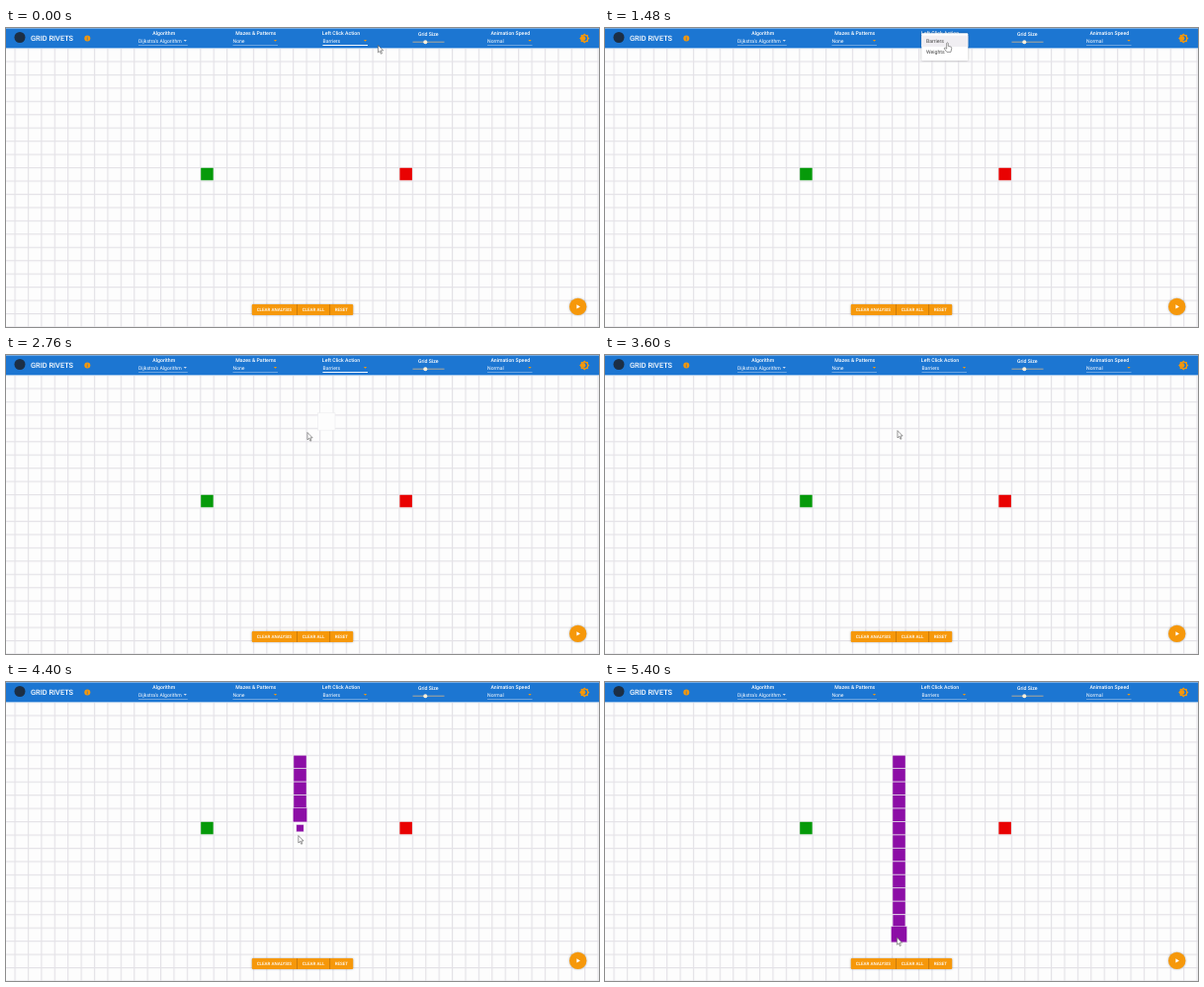
Write an HTML page that moves like this. It is 600x303 px and loops after 5440 ms.

```html
<!DOCTYPE html>
<html lang="en">
<head>
<meta charset="utf-8">
<title>Pathfinding grid</title>
<style>
html, body { margin: 0; height: 100%; overflow: hidden; background: #fdfdfd; }
svg { display: block; width: 600px; height: 303px; }
text { font: 500 5.2px Roboto, Arial, sans-serif; fill: #fff; text-rendering: geometricPrecision; }
.mid { text-anchor: middle; }
.value { font-weight: 400; font-size: 5.1px; }
.btn text { font-size: 4.5px; text-anchor: middle; }
.menu text { font-weight: 400; fill: #444; }
.drop { filter: drop-shadow(0 .6px .8px rgba(0, 0, 0, .3)); }
</style>
</head>
<body>
<svg viewBox="0 0 600 303">
  <defs>
    <pattern id="grid" x="290.1" y="73.8" width="13.41" height="13.45" patternUnits="userSpaceOnUse">
      <path d="M0 .6H13.41M.6 0V13.45" stroke="#e4e2e7" stroke-width="1.2" fill="none"/>
    </pattern>
  </defs>
  <rect width="600" height="303" fill="#fdfdfd"/>
  <rect y="21" width="600" height="282" fill="url(#grid)"/>
  <rect x="197.2" y="141.8" width="12.5" height="12.5" fill="#069a0a"/>
  <rect x="398.4" y="141.8" width="12.5" height="12.5" fill="#e90202"/>
  <g id="cells"></g>

  <rect y=".4" width="600" height="20" fill="#1c76d2"/>
  <circle cx="14" cy="9.5" r="5.5" fill="#1c2f45"/>
  <text x="25" y="13" style="font-size:7.4px">GRID RIVETS</text>
  <circle cx="82.3" cy="10.6" r="3" fill="#f6980a"/>
  <path d="M82.3 8.8v.8M82.3 10.2v2.2" stroke="#1c76d2" stroke-width=".7"/>
  <g id="fields"></g>
  <path id="focus" d="M320.5 17.5H366" stroke="#fff" stroke-width=".9"/>
  <text class="mid" x="427.3" y="7.6">Grid Size</text>
  <path d="M411.5 14.2H443.5" stroke="#d6b58a" stroke-width=".8"/>
  <circle cx="424.3" cy="14.2" r="2" fill="#fff0d8"/>
  <g transform="translate(585.3 10.5)" fill="#f6980a">
    <path d="M-3.6-3.6H3.6V3.6H-3.6Z"/>
    <path d="M-3.6-3.6H3.6V3.6H-3.6Z" transform="rotate(45)"/>
    <circle r="2.8" fill="#1c76d2"/>
    <circle cx="-1.3" r="2.4"/>
  </g>

  <g class="btn">
    <rect class="drop" x="248.8" y="280" width="102.4" height="11" rx="1" fill="#f6980a"/>
    <path d="M294.5 280v11M327.6 280v11" stroke="#b96f08" stroke-width=".7"/>
    <text x="271.3" y="287.1">CLEAR ANALYSIS</text>
    <text x="311" y="287.1">CLEAR ALL</text>
    <text x="339.4" y="287.1">RESET</text>
  </g>
  <circle class="drop" cx="578.7" cy="282.4" r="8.7" fill="#f6980a"/>
  <path d="M577.4 280.2L581 282.4 577.4 284.6Z" fill="#fff"/>

  <g id="menu" class="menu">
    <rect class="drop" x="320.3" y="5.3" width="47" height="27.6" rx="1" fill="#fff"/>
    <rect x="320.3" y="7.6" width="47" height="11.4" fill="#f0eef2"/>
    <rect id="ripple" x="325" y="8.2" width="32.4" height="10.6" rx="1.5" fill="#b9b9b9"/>
    <text x="325" y="15.1">Barriers</text>
    <text x="325" y="26.4">Weights</text>
  </g>

  <g id="cursor" stroke-linejoin="round" stroke="#555" stroke-width=".6" fill="#fff">
    <path id="arrow" d="M0 0V7.4L1.7 5.9 2.9 8.7 4 8.2 2.8 5.4H5.2Z"/>
    <path id="hand" d="M-.8.7Q0-.4.8.7V3.6L3.7 4.4Q4.4 4.7 4.3 5.6L3.5 9.6H-.6L-3.2 6.2Q-3.2 5-2 5.4L-.8 6.4Z"/>
  </g>
</svg>
<script>
const LOOP = 5440, COL = 13.41, ROW = 13.45, SIZE = 12.6;
const $ = id => document.getElementById(id);
const clamp = v => Math.max(0, Math.min(1, v));
const show = (id, on) => $(id).setAttribute('visibility', on ? 'visible' : 'hidden');

// label, label centre, value, left edge, caret x, caret colour
const fields = [
  ['Algorithm', 159.7, "Dijkstra's Algorithm", 134, 181.3, '#d5dff0'],
  ['Mazes &amp; Patterns', 252.8, 'None', 229.5, 272.5, '#f6980a'],
  ['Left Click Action', 339, 'Barriers', 320.5, 363.5, '#f6980a'],
  ['Animation Speed', 510.3, 'Normal', 487, 530, '#f6980a'],
];
$('fields').innerHTML = fields.map(([label, mid, value, x, caret, color]) => `
  <text class="mid" x="${mid}" y="7.2">${label}</text>
  <text class="value" x="${x}" y="14.7">${value}</text>
  <path d="M${caret - 1.6} 12.1h3.2l-1.6 1.7z" fill="${color}"/>
  <path d="M${x} 17.5H${caret + 2.5}" stroke="#9fc3ea" stroke-width=".6"/>`).join('');

// time, x, y of the pointer tip
const path = [
  [0, 376.5, 17.5], [400, 358, 13], [800, 355.5, 12.5], [1150, 353, 13], [1400, 347, 15],
  [1700, 345, 14], [2330, 345, 13.5], [2640, 322, 64], [2760, 305, 78.5], [3000, 298, 75],
  [3300, 296, 76.5], [3600, 296, 76.5], [3920, 295, 107.5], [4880, 296.7, 203.5], [LOOP, 295.3, 263],
];
function pointer(t) {
  const i = path.findIndex(p => p[0] > t);
  const [t0, x0, y0] = path[i - 1], [t1, x1, y1] = path[i];
  const k = (t - t0) / (t1 - t0);
  return [x0 + (x1 - x0) * k, y0 + (y1 - y0) * k];
}

// column and row relative to the top wall cell, time entered
const hovers = [[3, -4, 2410], [3, -3, 2490], [2, -2, 2570], [2, -1, 2655], [1, 0, 2770], [0, 0, 2890]];
const wallStart = r => r === 0 ? 3610 : r <= 8 ? 3690 + r * 137 : 4786 + (r - 8) * 105;

function pulse(age, from) {
  const k = age / 100;
  return k < 1 ? from + (1.4 - from) * k : Math.max(1, 1.4 - .4 * (k - 1));
}
function cell(col, row, scale, style) {
  const s = SIZE * scale;
  const x = 297.5 + col * COL - s / 2, y = 80.9 + row * ROW - s / 2;
  return `<rect x="${x}" y="${y}" width="${s}" height="${s}" ${style}/>`;
}

function draw(t) {
  let out = '';
  for (const [col, row, start] of hovers) {
    const age = t - start;
    if (age >= 0 && age < 200) out += cell(col, row, pulse(age, 1), 'fill="#fdfdfd" stroke="#ececee" stroke-width=".6"');
  }
  for (let r = 0; r < 14; r++) {
    const age = t - wallStart(r);
    if (age >= 0) out += cell(0, r, pulse(age, .3), 'fill="#8c0ea6"' + (age < 200 ? ' stroke="#f4e8f7" stroke-width=".5"' : ''));
  }
  $('cells').innerHTML = out;

  $('menu').setAttribute('opacity', clamp((t - 560) / 120) * clamp((2370 - t) / 110));
  $('ripple').setAttribute('opacity', clamp((t - 2100) / 120));

  const onMenu = t > 260 && t < 2380;
  $('cursor').setAttribute('transform', `translate(${pointer(t)})`);
  show('hand', onMenu);
  show('arrow', !onMenu);
  show('focus', t < 3600);
}

const begin = performance.now();
function tick() {
  draw((performance.now() - begin) % LOOP);
  requestAnimationFrame(tick);
}
tick();
</script>
</body>
</html>
```
